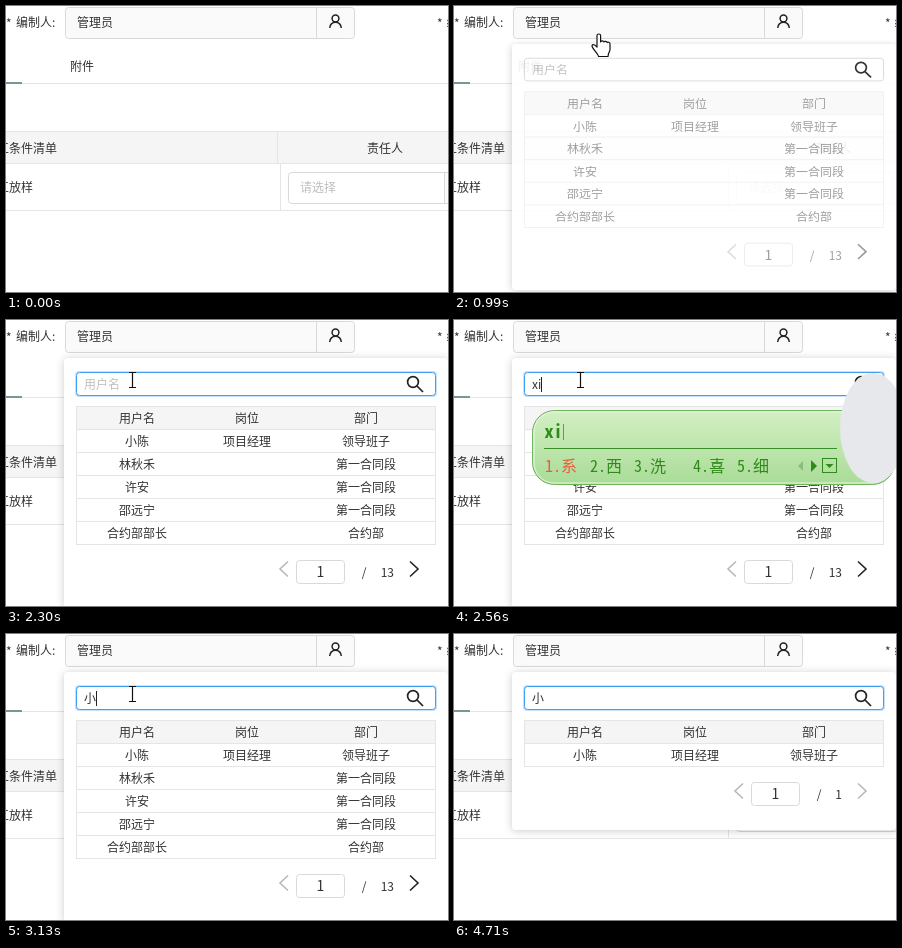
Write an HTML page that moves like this. It is 442 px wide and 286 px high and loops after 4.81 s.

```html
<!DOCTYPE html>
<html lang="zh-CN">
<head>
<meta charset="utf-8">
<title>选择编制人</title>
<style>
  html, body { margin: 0; width: 100%; height: 100%; overflow: hidden; background: #fff; }
  svg { display: block; }
  text { font: 12px "Noto Sans CJK SC", "Noto Sans CJK", sans-serif; fill: #333; white-space: pre; }
  .hint { fill: #bfbfbf; }
  .mid { text-anchor: middle; }
  .num { font-size: 14px; }
  .box { fill: #fff; stroke: #d9d9d9; }
  .addon { fill: #fafafa; }
  .rule { stroke: #e5e5e5; fill: none; }
  .icon { stroke: #222; fill: none; }
  .shadow { fill: #fff; filter: drop-shadow(0 1px 4px #0003); }
  #ime text { font: 16px "Noto Sans Mono CJK SC", "Noto Sans CJK SC", monospace; fill: #2f8a1a; }
  #ime #pinyin { font-size: 18px; font-weight: bold; }
  #ime .first { fill: #ee5a3c; }
  #cursor path { fill: #fff; stroke: #111; stroke-width: 1.2; stroke-linejoin: round; }
</style>
</head>
<body>
<svg width="442" height="286" viewBox="0 0 442 286">
  <g id="form">
    <text x="0" y="22">*</text><text x="10" y="20.5">编制人:</text>
    <text x="431" y="22">*</text><text x="440.5" y="20.5">编</text>
    <rect class="box addon" x="59.5" y="1.5" width="289" height="31" rx="3"/>
    <path d="M310.5 2v30" stroke="#d9d9d9"/>
    <text x="71" y="21">管理员</text>
    <g class="icon" stroke-width="1.5"><circle cx="329.5" cy="12.5" r="3.4"/><path d="M323.7 22a5.8 5.8 0 0 1 11.6 0"/></g>
    <text x="64" y="65">附件</text>
    <path class="rule" d="M0 77.5H442"/>
    <path d="M0 77H16" stroke="#7b9497" stroke-width="2"/>
    <rect y="125" width="442" height="33" fill="#f5f5f5"/>
    <path class="rule" d="M0 125.5H442M0 157.5H442M0 204.5H442M271.5 126V157M274.5 158V204"/>
    <text x="-9" y="147">工条件清单</text><text x="-9" y="186">工放样</text>
    <text class="mid" x="379" y="147">责任人</text>
    <rect class="box" x="282.5" y="166.5" width="180" height="31" rx="3"/>
    <path class="addon" d="M439 167h9v30h-9z"/>
    <path d="M438.5 167v30" stroke="#d9d9d9"/>
    <text class="hint" x="294" y="186">请选择</text>
  </g>
  <g id="popup">
    <rect id="panel" class="shadow" x="58" y="38" width="384" rx="4"/>
    <rect id="glow" x="69" y="51" width="362" height="26" rx="4" fill="#1890ff" opacity="0"/>
    <rect class="box" x="70.5" y="52.5" width="359" height="23" rx="3"/>
    <rect id="focus" x="70.5" y="52.5" width="359" height="23" rx="3" fill="none" stroke="#40a0f0"/>
    <text id="hint" class="hint" x="78" y="68.5">用户名</text>
    <text id="query" x="78" y="68.5"></text>
    <path id="caret" d="M.5 57v15" stroke="#222"/>
    <g class="icon" stroke-width="1.7"><circle cx="407" cy="62" r="5.4"/><path d="M411 66l6 6"/></g>
    <g id="results">
      <rect x="70" y="86" width="360" height="23" fill="#f5f5f5"/>
      <g id="rows"></g>
      <rect id="frame" class="rule" x="70.5" y="86.5" width="359"/>
      <g id="pager">
        <g id="pageBox">
          <path d="M282 241.500l-8 7.500 8 7.500" fill="none" stroke="#b8b8b8" stroke-width="1.6"/>
          <rect class="box" x="290.5" y="240.500" width="48" height="23" rx="3"/>
          <text class="mid num" x="314.5" y="257">1</text>
          <text class="mid" x="358" y="257">/</text>
        </g>
        <text id="pages" x="388" y="257" text-anchor="end"></text>
        <path id="next" d="M404 241.500l8 7.500-8 7.500" fill="none" stroke-width="1.6"/>
      </g>
    </g>
  </g>
  <g id="ime">
    <linearGradient id="green" x2="0" y2="1"><stop stop-color="#d3efc4"/><stop offset="1" stop-color="#a9dc97"/></linearGradient>
    <rect x="78.500" y="90.500" width="362" height="74" rx="22" fill="url(#green)" stroke="#6fb35c"/>
    <rect x="80" y="92" width="359" height="71" rx="20.500" fill="none" stroke="#e6f7dd"/>
    <text id="pinyin" x="90.500" y="118"></text>
    <path id="imeCaret" d="M.5 104v16" stroke="#ee5a3c"/>
    <path d="M90 128.500H383" stroke="#3b8f28"/>
    <g id="candidates"></g>
    <g id="emoji">
      <circle cx="206" cy="146" r="8" fill="#f3c748"/>
      <path d="M202 144h2.500m3 0h2.500M202 148q4 5 8 0" fill="none" stroke="#8a6420"/>
      <path d="M217.500 149h8l-4 4z" fill="#74b35f"/>
    </g>
    <path d="M349 141v10l-5-5z" fill="#8abf79"/><path d="M357 140v12l6-6z" fill="#2f8a1a"/>
    <rect x="368.500" y="138.500" width="14" height="14" fill="none" stroke="#2f8a1a"/>
    <path d="M371.500 144h8l-4 4z" fill="#2f8a1a"/>
    <ellipse cx="419" cy="108" rx="33" ry="55" fill="#e6e8eb"/>
  </g>
  <g id="cursor"><path/></g>
</svg>
<script>
const LOOP = 4810;
const $ = id => document.getElementById(id);
const clamp = v => Math.max(0, Math.min(1, v));
const show = (id, on) => $(id).setAttribute('display', on ? 'inline' : 'none');
const set = (id, attrs) => { for (const k in attrs) $(id).setAttribute(k, attrs[k]); };

const table = [
  ['用户名', '岗位', '部门'],
  ['小陈', '项目经理', '领导班子'],
  ['林秋禾', '', '第一合同段'],
  ['许安', '', '第一合同段'],
  ['邵远宁', '', '第一合同段'],
  ['合约部部长', '', '合约部']
];
const columns = [131, 241, 360];
$('rows').innerHTML = table.map((cells, r) => '<g>' +
  cells.map((s, c) => `<text class="mid" x="${columns[c]}" y="${103 + 23 * r}">${s}</text>`).join('') +
  `<path class="rule" d="M70 ${109.5 + 23 * r}H430"/></g>`).join('');

const typing = [[0, ''], [2480, 'x'], [2560, 'xi'], [2730, 'xia'], [2810, 'xiao'], [3050, '小']];
const candidates = {
  x: ['想', '下', '小', '向', '像'],
  xi: ['系', '西', '洗', '喜', '细'],
  xia: ['下', '夏', '吓', '虾', '下午'],
  xiao: ['小', '笑', '', '潇', '下哦']
};
const slots = [91, 136, 180, 239, 283];

// Pointer moves: start time, steps of 80 ms, and a quadratic curve.
const moves = [
  { at: 80, steps: 7, curve: [[389, 287], [120, -30], [145, 28]] },
  { at: 1240, steps: 7, curve: [[145, 28], [148, 118], [126.5, 60]] },
  { at: 4380, steps: 3, curve: [[126.5, 60], [313, 211], [500, 363]] }
];
const shapes = {
  arrow: 'M0 0V16L3.7 12.4 6.2 18 8.6 17 6.2 11.500H11.500z',
  hand: 'M-2 1.500c0-2 3.600-2 3.600 0V8c0-1.600 3-1.600 3.400 0c0-1 2.800-1 3.200.6c.4-.8 2.800-.6 2.800 1.400v5.500c0 2-2 3.500-2 7H-.5c0-2.500-5.500-7-6.400-10c-.6-2 1.800-3 4.900.5z',
  beam: 'M-3.500-7.500H3.500M0-7.500V7.500M-3.500 7.500H3.500'
};

function pointer(t) {
  const move = moves.filter(m => t >= m.at).pop();
  if (!move) return null;
  const u = Math.min(1, (Math.floor((t - move.at) / 80) + 1) / move.steps);
  const [a, b, c] = move.curve;
  return [0, 1].map(i => (1 - u) ** 2 * a[i] + 2 * u * (1 - u) * b[i] + u * u * c[i]);
}

function pointerShape(x, y, bottom) {
  if (!bottom) return y < 33 && x < 349 ? 'hand' : 'arrow';
  if (y > 52 && y < 76) return 'beam';
  return y < bottom ? 'hand' : 'arrow';
}

function drawPopup(t, text) {
  const open = 1 - (1 - clamp((t - 790) / 280)) ** 2;
  const filtered = t >= 3220;
  const lift = filtered ? 92 : 0;
  set('popup', { opacity: open, transform: `translate(0 ${38 * (0.2 - 0.2 * open)}) scale(1 ${0.8 + 0.2 * open})` });
  set('panel', { height: 250 - lift });
  set('frame', { height: 138 - lift });
  [...$('rows').children].forEach((row, i) => row.setAttribute('display', filtered && i > 1 ? 'none' : 'inline'));
  set('pager', { transform: `translate(0 ${-lift})` });
  set('pageBox', { transform: `translate(${filtered ? 7 : 0} 0)` });
  set('next', { stroke: filtered ? '#b8b8b8' : '#222' });
  $('pages').textContent = filtered ? '1' : '13';
  const loading = t >= 3140 && !filtered;
  set('results', { opacity: loading ? 0.5 : 0.5 + 0.5 * clamp((t - 1200) / 240) });

  const focus = clamp((t - 1770) / 200);
  set('focus', { opacity: focus });
  set('glow', { opacity: 0.25 * focus });
  show('hint', !text);
  $('query').textContent = text;
  const blinkOff = (t >= 2300 && t < 2480) || (t >= 3630 && t < 4210) || t >= 4710;
  show('caret', t >= 1810 && !blinkOff);
  const width = text ? $('query').getComputedTextLength() : 0;
  set('caret', { transform: `translate(${Math.round(78 + width)} 0)` });
}

function drawIme(text) {
  const words = candidates[text];
  show('ime', words);
  if (!words) return;
  $('pinyin').textContent = text;
  set('imeCaret', { transform: `translate(${Math.round(91 + $('pinyin').getComputedTextLength())} 0)` });
  $('candidates').innerHTML = words.map((w, i) =>
    `<text class="${i ? '' : 'first'}" x="${slots[i]}" y="152">${i + 1}.${w}</text>`).join('');
  show('emoji', text === 'xiao');
}

function drawPointer(t) {
  const at = pointer(t);
  show('cursor', at);
  if (!at) return;
  const bottom = t < 830 ? 0 : t < 3220 ? 288 : 196;
  set('cursor', { transform: `translate(${at})` });
  $('cursor').firstElementChild.setAttribute('d', shapes[pointerShape(...at, bottom)]);
}

const start = performance.now();
function draw() {
  const t = (performance.now() - start) % LOOP;
  const text = typing.filter(([at]) => t >= at).pop()[1];
  drawPopup(t, text);
  drawIme(text);
  drawPointer(t);
  requestAnimationFrame(draw);
}
draw();
</script>
</body>
</html>
```
